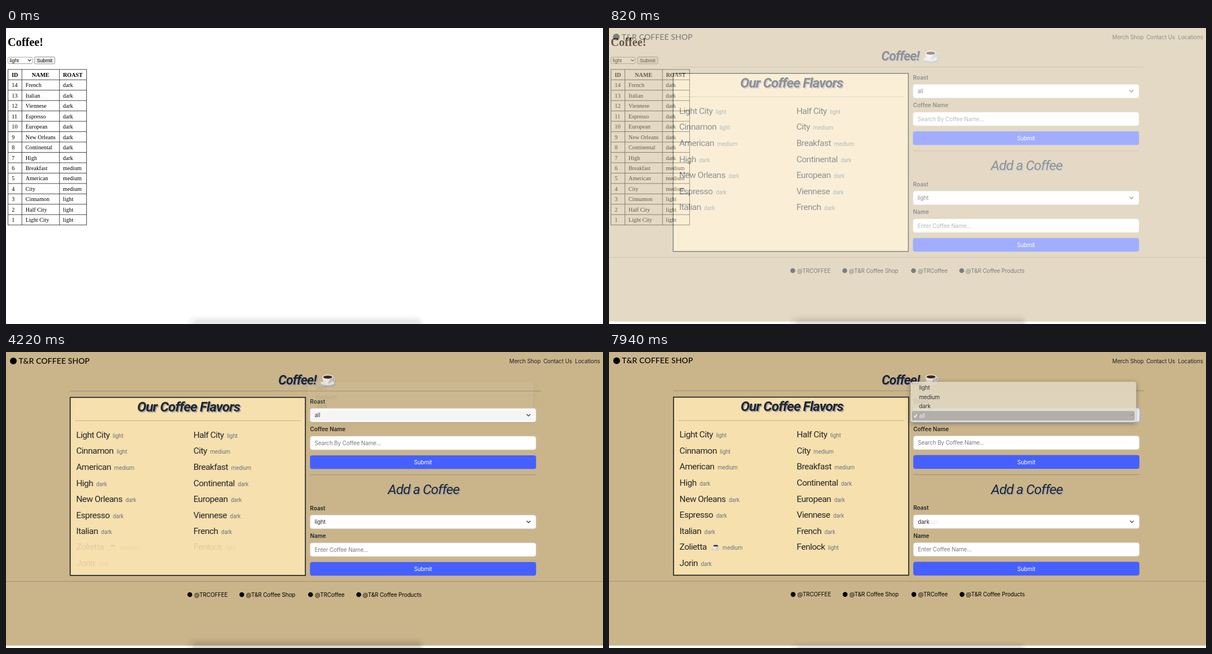
An HTML page for the animation above (8 s loop, 1063 by 527 pixels).

```html
<!DOCTYPE html>
<html lang="en">
<head>
<meta charset="utf-8">
<title>Coffee shop</title>
<style>
html, body { margin: 0; width: 100%; height: 100%; overflow: hidden; background: #fff; }
svg { display: block; width: 1063px; height: 527px; }
text { white-space: pre; }
.serif { font: 10.2px "Liberation Serif", Times, serif; }
.serif .b { font-weight: 700; text-anchor: middle; }
.ctl { font: 8.8px "Liberation Sans", Arial, sans-serif; }
.ui { font: 10px Inter, sans-serif; letter-spacing: -.15px; fill: #212529; }
.label { font-weight: 600; letter-spacing: 0; }
.hint { fill: #75797e; }
.btn { fill: #fff; text-anchor: middle; }
.logo { font: 500 14px Lato, sans-serif; letter-spacing: .15px; }
.item { font: 15.5px Roboto, sans-serif; letter-spacing: -.5px; fill: #212529; }
.roast { font-size: 10px; letter-spacing: -.1px; fill: #6c757d; }
.head { font: italic 700 24.5px Roboto, sans-serif; letter-spacing: -.95px; fill: #212529; text-anchor: middle; }
.shadow { filter: drop-shadow(2px 2px .6px #a5a5ae); }
.hr { stroke: #212529; stroke-opacity: .27; }
.field { fill: #fff; stroke: #dee2e6; stroke-width: .7; }
.line { fill: none; stroke: #343a40; stroke-width: 1.3; stroke-linecap: round; stroke-linejoin: round; }
</style>
</head>
<body>
<svg id="stage" viewBox="0 0 1063 527"></svg>
<script>
const coffees = [
  ["Light City", "light"], ["Half City", "light"], ["Cinnamon", "light"], ["City", "medium"],
  ["American", "medium"], ["Breakfast", "medium"], ["High", "dark"], ["Continental", "dark"],
  ["New Orleans", "dark"], ["European", "dark"], ["Espresso", "dark"], ["Viennese", "dark"],
  ["Italian", "dark"], ["French", "dark"]
];
const added = [["Zolietta", "medium", true], ["Fenlock", "light"], ["Jorin", "dark"]];
// Table order differs from the two-column list
const tableOrder = [13, 12, 11, 10, 9, 8, 7, 6, 5, 4, 3, 2, 1, 0];

const text = (x, y, s, cls = "", more = "") => `<text x="${x}" y="${y}" class="${cls}" ${more}>${s}</text>`;
const rect = (x, y, w, h, more) => `<rect x="${x}" y="${y}" width="${w}" height="${h}" ${more}/>`;
const path = (d, more) => `<path d="${d}" ${more}/>`;
const chevron = y => path(`M927.3 ${y - 1.5}l3 3 3-3`, 'class="line"');

const dock = (y, k) =>
  rect(322, y, 422, 40, `rx="14" fill-opacity="${.045 * k}" filter="url(#soft)"`) +
  rect(332, y + 6, 408, 40, `rx="10" fill-opacity="${.09 * k}" filter="url(#soft)"`);

const cup = (x, y, k) => `<g transform="translate(${x} ${y}) scale(${k})">
  <ellipse cx="12.5" cy="17.5" rx="12" ry="4.2" fill="#b9b6b1"/>
  <ellipse cx="12.5" cy="16.8" rx="11.5" ry="3.6" fill="#e3e1dd"/>
  <circle cx="21.5" cy="10.5" r="3.2" fill="none" stroke="#d3d1cd" stroke-width="1.6"/>
  <path d="M4 6.5Q4.5 17.5 13 18Q21.500 17.500 22 6.500z" fill="#e9e7e4"/>
  <path d="M13 18Q21.500 17.500 22 6.500L18 8z" fill="#c4c1bc"/>
  <ellipse cx="13" cy="6.500" rx="9" ry="3.600" fill="#f0eeeb"/>
  <ellipse cx="13" cy="6.800" rx="7.600" ry="2.600" fill="#40251a"/></g>`;

function plainPage() {
  let s = rect(0, 0, 1063, 527, 'fill="#fff"') + dock(513, .7);
  s += `<g class="serif">` + text(3, 31.7, "Coffee!", "", 'font-size="20.4" font-weight="700"');
  s += text(15.8, 86.8, "ID", "b") + text(61.5, 86.8, "NAME", "b") + text(119, 86.8, "ROAST", "b");
  tableOrder.forEach((id, i) => {
    const y = 105.3 + i * 18.46;
    // Two pairs sit in a different place in the id order
    const names = ["Light City", "Half City", "Cinnamon", "City", "American", "Breakfast", "High",
      "Continental", "New Orleans", "European", "Espresso", "Viennese", "Italian", "French"];
    const roast = coffees.find(c => c[0] == names[id])[1];
    s += text(10.3, y, id + 1) + text(34.8, y, names[id]) + text(101.3, y, roast);
  });
  s += "</g>";
  let grid = "";
  for (let i = 0; i < 16; i++) grid += `M3 ${73.8 + i * 18.46}H144`;
  for (const x of [3.5, 28.3, 95.2, 143.5]) grid += `M${x} 73.800V350.700`;
  s += path(grid, 'stroke="#333" stroke-width=".9"');
  s += rect(3.5, 52, 43.5, 11.5, 'rx="2" fill="#fff" stroke="#767676" stroke-width=".7"');
  s += rect(50.7, 51.3, 36.3, 12.6, 'rx="2" fill="#efefef" stroke="#767676" stroke-width=".7"');
  s += path("M39.5 56.500l2.300 2.300 2.300-2.300", 'class="line" stroke-width="1.2"');
  return s + text(6.6, 60.7, "light", "ctl") + text(68.8, 60.7, "Submit", "ctl", 'text-anchor="middle"');
}

function form(y, nameLabel, value, hint) {
  const box = dy => rect(541.5, y + dy, 402, 24, 'rx="4" class="field"');
  return text(541.3, y + 3.5, "Roast", "ui label") +
    box(12.5) + text(549.4, y + 28.2, value, "ui") + chevron(y + 24.5) +
    text(541.3, y + 53, nameLabel, "ui label") +
    box(62) + text(549.4, y + 77.7, hint, "ui hint") +
    rect(541.2, y + 96, 402.6, 24.3, 'rx="4" fill="#4660ff"') +
    text(742.5, y + 112, "Submit", "ui btn");
}

function menu() {
  let s = rect(537, 53, 401.7, 72, 'rx="4" fill="url(#glass)" style="filter:drop-shadow(0 2px 4px #0006)"');
  s += rect(539.5, 105, 396.5, 17, 'rx="3" fill="#aaa6a1"');
  ["light", "medium", "dark"].forEach((v, i) => s += text(552, 67.2 + i * 16.6, v, "ui"));
  return s + path("M543.300 113.800l1.800 2.300 3-5", 'class="line" style="stroke:#fff"') +
    text(552, 116.8, "all", "ui", 'style="fill:#fff"');
}

function shopPage(list, roast, open, late) {
  let s = rect(-2, -2, 1068, 530, 'fill="#fff"') + rect(-2, -2, 1068, 524.7, 'fill="#cab58b"');
  s += late ? dock(516, .9) : dock(510, 1.1);
  s += text(896, 19.6, "Merch Shop", "ui") + text(956.7, 19.6, "Contact Us", "ui") + text(1013.2, 19.6, "Locations", "ui");
  s += `<g ${late ? 'transform="translate(.6 -.4)"' : ""}>`;
  s += `<circle cx="13" cy="16" r="6"/>` + text(22.5, 20.6, "T&amp;R COFFEE SHOP", "logo");
  s += `<g class="shadow">` + text(518.7, 58, "Coffee!", "head", 'style="font-size:23.3px;letter-spacing:-.9px"') +
    cup(559, 37.5, 1.06) + "</g>";
  s += path("M114 69.500H952", 'class="hr"');
  s += rect(114.3, 80.8, 418.7, 317, 'fill="#f6e0ae" stroke="#17191b" stroke-width="1.6"');
  s += path("M123 122.500H525M541.500 218.700H944M-2 408.500H1065", 'class="hr"');
  s += `<g class="shadow">` + text(325, 105.7, "Our Coffee Flavors", "head") +
    text(743.5, 253, "Add a Coffee", "head", 'style="font-weight:400;font-size:24.5px;letter-spacing:-.85px"') + "</g>";
  list.forEach(([name, kind, hasCup], i) => {
    const x = i % 2 ? 333.7 : 125, y = 152.7 + (i >> 1) * 28.6;
    s += hasCup
      ? text(x, y, name, "item") + cup(x + 57, y - 11.5, .57) + text(x + 76.5, y, kind, "item roast", 'style="font-size:10px;letter-spacing:-.1px;fill:#6c757d"')
      : text(x, y, `${name}<tspan dx="5.5" class="roast">${kind}</tspan>`, "item");
  });
  if (late) s += rect(541.5, 100.5, 402, 24, 'rx="4" fill="none" stroke="#b3b8f5" stroke-width="4"');
  s += form(88, "Coffee Name", "all", "Search By Coffee Name...") + form(278, "Name", roast, "Enter Coffee Name...");
  const social = [[327.2, 335, "@TRCOFFEE"], [419.8, 427.3, "@T&amp;R Coffee Shop"],
    [542.2, 550, "@TRCoffee"], [628, 635, "@T&amp;R Coffee Products"]];
  for (const [cx, x, label] of social)
    s += `<circle cx="${cx}" cy="432" r="4.3"/>` + text(x, 435.7, label, "ui", 'style="fill:#000"');
  return s + "</g>" + (open ? menu() : "");
}

const full = coffees.concat(added);
const pages = [plainPage(), shopPage(coffees, "light"), shopPage(full, "dark", true, true), shopPage(full, "medium", false, true)];
const stage = document.getElementById("stage");
stage.innerHTML = `<defs>
  <filter id="soft" x="-10%" y="-40%" width="120%" height="180%"><feGaussianBlur stdDeviation="2"/></filter>
  <linearGradient id="glass" x1="0" y1="0" x2="0" y2="1">
    <stop stop-color="#e1d7bf"/><stop offset=".65" stop-color="#e1d8c3"/><stop offset="1" stop-color="#dcdad7"/>
  </linearGradient></defs>` + pages.map(p => `<g class="page">${p}</g>`).join("");

const layers = [...document.querySelectorAll(".page")];
const fadeStart = [-Infinity, 500, 4220, 7940];
const start = performance.now();

function draw() {
  const t = (performance.now() - start) % 8000;
  layers.forEach((layer, i) => {
    const step = Math.floor((t - fadeStart[i]) / 80) + 1;
    const alpha = i ? Math.max(0, Math.min(10, step)) / 10 : 1;
    layer.style.opacity = alpha;
    layer.style.display = alpha ? "" : "none";
  });
  requestAnimationFrame(draw);
}
draw();
</script>
</body>
</html>
```
